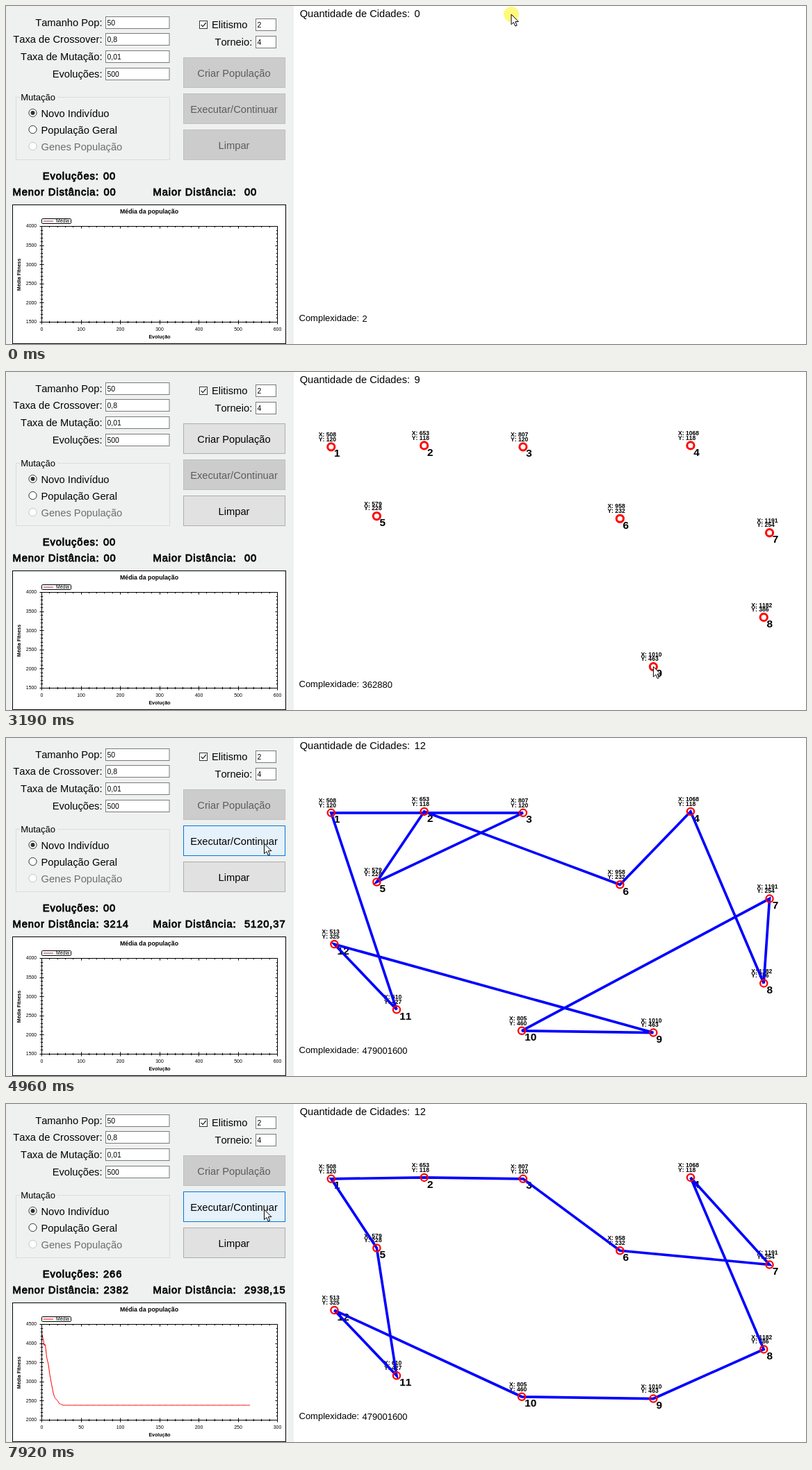
An HTML page that plays this animation: 1151 px wide and 487 px high, repeating every 8000 ms.

```html
<!DOCTYPE html>
<html lang="pt">
<head>
<meta charset="utf-8">
<style>
html, body { margin: 0; width: 100%; height: 100%; overflow: hidden; background: #fff; }
svg { display: block; width: 1151px; height: 487px; }
text { font-family: "Liberation Sans", Arial, sans-serif; font-size: 14.7px; font-kerning: none; white-space: pre; }
.b { stroke: #000; stroke-width: .8px; letter-spacing: .92px; }
.num { font-size: 15.4px; font-weight: bold; }
.xy { font-size: 8.6px; font-weight: bold; }
.in { font-size: 10.4px; }
.md { font-size: 13px; }
.tiny { font-size: 6.9px; }
.axis { font-size: 7px; font-weight: bold; }
.title { font-size: 8.8px; font-weight: bold; }
</style>
</head>
<body>
<svg id="stage" viewBox="0 0 1151 487">
  <g id="form"></g>
  <g id="chart"></g>
  <g id="map"></g>
  <circle id="press" r="11" fill="#fff97c"/>
  <g id="rings"></g>
  <path id="arrow" d="M0 0V14.6L3.4 11.5 5.8 17 8.2 16 5.8 10.6H10.4Z" fill="#fff" stroke="#000" stroke-width="1"/>
</svg>
<script>
const LOOP = 8000;
const $ = id => document.getElementById(id);
const text = (x, y, s, cls = '', anchor = 'start', fill = '#000') =>
  `<text x="${x}" y="${y}" class="${cls}" text-anchor="${anchor}" fill="${fill}">${s}</text>`;
const rect = (x, y, w, h, fill, stroke, extra = '') =>
  `<rect x="${x}" y="${y}" width="${w}" height="${h}" fill="${fill}" stroke="${stroke}" ${extra}/>`;
const line = (x1, y1, x2, y2) => `M${x1} ${y1}L${x2} ${y2}`;
const snap = v => Math.floor(v) + .5;

// X and Y as labelled, and the moment each city is added
const cities = [
  [508, 120, 240], [653, 118, 620], [807, 120, 1010], [1068, 118, 1480],
  [579, 228, 1860], [958, 232, 2110], [1191, 254, 2440], [1182, 386, 2850],
  [1010, 463, 3170], [805, 460, 3500], [610, 427, 3840], [513, 325, 4120]
].map(([X, Y, t]) => ({ X, Y, t, x: 467.8 + (X - 508) * .9235, y: 107.8 + (Y - 120) * .9235 }));

const CREATE = 4450, RUN = 4940;
const stops = [
  { x: 727, y: 12, t: 65 },
  ...cities,
  { x: 388.5, y: 92, t: CREATE },
  { x: 388.5, y: 92, t: 4560, idle: true },
  { x: 371.5, y: 152, t: RUN }
];

const stages = [
  { from: 0, tour: [1, 3, 5, 2, 6, 4, 8, 7, 10, 9, 12, 11], worst: '5120,37' },
  { from: 12, tour: [1, 3, 2, 6, 7, 4, 8, 9, 11, 10, 12, 5], worst: '4306,82' },
  { from: 20, tour: [1, 2, 3, 6, 7, 4, 8, 9, 11, 10, 12, 5], worst: '3482,6' },
  { from: 32, tour: [1, 2, 3, 6, 7, 4, 8, 9, 10, 12, 11, 5], worst: '2938,15' }
];
for (const s of stages) {
  s.path = s.tour.map(n => cities[n - 1]);
  s.best = Math.round(s.path.reduce((sum, c, i) => {
    const d = s.path[(i + 1) % s.path.length];
    return sum + Math.hypot(c.X - d.X, c.Y - d.Y);
  }, 0));
}

// Mean fitness of each generation, as heights on the 2000 to 4500 scale
const drop = [330, 336, 339, 348, 346, 352, 363, 369, 373, 380, 389, 395, 401, 407, 413, 418,
  421.5, 424, 425, 426.5, 427.5, 429, 431.5, 432, 432.3, 433, 433.3, 434];
const mean = e => 4500 - (drop[Math.min(e, drop.length - 1)] - 317.5) * 2500 / 138;

const runs = [[4950, 0], [5580, 60], [6670, 163], [7920, 266], [8000, 266]];
function generation(t) {
  for (let i = runs.length - 2; i >= 0; i--) {
    const [t0, e0] = runs[i], [t1, e1] = runs[i + 1];
    if (t < t0) continue;
    const n = Math.round((t1 - t0) / 78);
    return Math.round(e0 + (e1 - e0) * Math.floor((t - t0) / (t1 - t0) * n) / n);
  }
  return 0;
}

function field(x, y, w, value) {
  return rect(x + .5, y + .5, w, 17, '#fff', '#7a7a7a') + text(x + 2.5, y + 12.7, value, 'in');
}

function button(y, label, state) {
  const [fill, edge, ink] = {
    off: ['#ccc', '#bfbfbf', '#5c5c5c'],
    on: ['#e1e1e1', '#adadad', '#000'],
    hover: ['#e5f1fb', '#0078d7', '#000'],
    down: ['#cce4f7', '#005499', '#000']
  }[state];
  return rect(255.5, y + .5, 146, 43, fill, edge) + text(328, y + 27.5, label, '', 'middle', ink);
}

function radio(y, label, on, enabled = true) {
  const edge = enabled ? '#333' : '#c4c4c4';
  return `<circle cx="38.5" cy="${y}" r="5.6" fill="#fff" stroke="${edge}"/>` +
    (on ? `<circle cx="38.5" cy="${y}" r="3" fill="#333"/>` : '') +
    text(50.5, y + 5.7, label, '', 'start', enabled ? '#000' : '#6d6d6d');
}

function drawForm(ui) {
  const rows = [['Tamanho Pop:', '50', 15], ['Taxa de Crossover:', '0,8', 39],
    ['Taxa de Mutação:', '0,01', 64], ['Evoluções:', '500', 89]];
  return rect(0, 0, 414, 487, '#eff0f0', 'none') +
    rows.map(([s, v, y]) => text(138.5, y + 14.3, s, '', 'end') + field(143, y, 91.5, v)).join('') +
    rect(278.5, 21.5, 11, 11, '#fff', '#333') +
    '<path d="M280.7 27L283.2 29.7 287.8 24" fill="none" stroke="#222" stroke-width="1.2"/>' +
    text(296, 31.5, 'Elitismo') + field(359, 18, 29, '2') +
    text(354.3, 57, 'Torneio:', '', 'end') + field(359, 43, 29, '4') +
    rect(14.5, 131.5, 221, 90, 'none', '#dcdcdc') + rect(20, 128, 54, 8, '#eff0f0', 'none') +
    text(21.2, 136, 'Mutação', 'md') +
    radio(154, 'Novo Indivíduo', true) + radio(178, 'População Geral') +
    radio(202, 'Genes População', false, false) +
    button(74, 'Criar População', ui.create) +
    button(126, 'Executar/Continuar', ui.run) +
    button(178, 'Limpar', ui.clear) +
    text(52.7, 249.7, 'Evoluções:', 'b') + text(140, 249.7, ui.evo || '00', 'b') +
    text(9.5, 272.7, 'Menor Distância:', 'b') + text(140.5, 272.7, ui.best, 'b') +
    text(211.5, 272.7, 'Maior Distância:', 'b') + text(343, 272.7, ui.worst, 'b');
}

// Automatic axis: ten percent grace, about seven steps of 1, 2 or 5
function scale(min, max, fromZero) {
  const grace = (max - min) * .1;
  const lo = fromZero ? 0 : min - grace, hi = max + grace;
  const raw = (hi - lo) / 7, mag = 10 ** Math.floor(Math.log10(raw));
  const m = Math.floor(raw / mag + .5);
  const step = mag * (m > 5 ? 10 : m > 2 ? 5 : m > 1 ? 2 : 1);
  return { lo: Math.floor(lo / step) * step, hi: Math.ceil(hi / step) * step, step };
}

function drawChart(evo) {
  let ax = { lo: 0, hi: 600, step: 100 }, ay = { lo: 1500, hi: 4000, step: 500 };
  if (evo > 1) {
    ax = scale(0, evo - 1, true);
    ay = scale(mean(evo - 1), mean(0));
  }
  const L = 51.5, T = 317.5, B = 455.5;
  const R = 390.5 + 1.5 * (3 - String(ax.hi).length);
  const px = v => L + (v - ax.lo) / (ax.hi - ax.lo) * (R - L);
  const py = v => B - (v - ay.lo) / (ay.hi - ay.lo) * (B - T);
  const fmt = (v, step) => step < 1 ? v.toFixed(1) : Math.round(v);
  let ticks = '', labels = '';
  const nx = Math.round((ax.hi - ax.lo) / ax.step * 5);
  for (let i = 0; i <= nx; i++) {
    const v = ax.lo + i * ax.step / 5, x = px(v), tx = snap(x), s = i % 5 ? 1.7 : 3;
    ticks += line(tx, B - s, tx, B + s) + line(tx, T, tx, T + s);
    if (i % 5 === 0) labels += text(x, 467.6, fmt(v, ax.step), 'tiny', 'middle');
  }
  const ny = Math.round((ay.hi - ay.lo) / ay.step * 5);
  for (let i = 0; i <= ny; i++) {
    const v = ay.lo + i * ay.step / 5, y = py(v), ty = snap(y), s = i % 5 ? 1.7 : 3;
    ticks += line(L - s, ty, L + s, ty) + line(R, ty, R - s, ty);
    if (i % 5 === 0) labels += text(44.2, y + 1.9, fmt(v, ay.step), 'tiny', 'end');
  }
  let curve = '';
  if (evo > 1) for (let e = 0; e < evo; e++) curve += `${px(e).toFixed(2)},${py(mean(e)).toFixed(2)} `;
  return rect(9.5, 286.5, 393, 200, '#fff', '#000') +
    text(206, 298.7, 'Média da população', 'title', 'middle') +
    rect(51.5, 306.5, 42, 7, '#fff', '#000', 'rx="1"') +
    `<path d="M54 310H68" stroke="${evo ? '#f00' : '#a03030'}"/>` + text(72, 312.1, 'Média', 'tiny') +
    `<polyline points="${curve}" fill="none" stroke="#f00"/>` +
    rect(L, T, R - L, B - T, 'none', '#000') +
    `<path d="${ticks}" stroke="#000"/>` + labels +
    text((L + R) / 2, 478.6, 'Evolução', 'axis', 'middle') +
    `<g transform="translate(20.7 387) rotate(-90)">${text(0, 0, 'Média Fitness', 'axis', 'middle')}</g>`;
}

function drawMap(shown, stage) {
  let fact = 1;
  for (let i = 2; i <= shown.length; i++) fact *= i;
  const ring = (c, w) => `<circle cx="${c.x}" cy="${c.y}" r="5.1" fill="none" stroke="#f00" stroke-width="${w}"/>`;
  const notes = shown.map((c, i) =>
    text(c.x - 18, c.y - 14.9, 'X: ' + c.X, 'xy') + text(c.x - 18, c.y - 8.1, 'Y: ' + c.Y, 'xy') +
    text(c.x + 4.2, c.y + 14.6, i + 1, 'num')).join('');
  const route = stage
    ? `<polygon points="${stage.path.map(c => c.x + ',' + c.y).join(' ')}" fill="none" stroke="#00f" stroke-width="3.7"/>` : '';
  $('map').innerHTML = text(422.7, 15.5, 'Quantidade de Cidades:') + text(587.5, 15.5, shown.length) +
    text(421.5, 454.2, 'Complexidade:', 'md') + text(512.5, 454.7, shown.length ? fact : 2, 'md') +
    notes + route;
  $('rings').innerHTML = shown.map(c => ring(c, stage ? 2.3 : 3)).join('');
}

function pointer(t) {
  let i = stops.findIndex(s => t < s.t);
  if (i < 0) i = stops.length - 1;
  const b = stops[i], a = stops[Math.max(i - 1, 0)];
  const start = a.t + 100, end = b.t - 110;
  let k = i < 2 ? 1 : Math.min(1, Math.max(0, (t - start) / (end - start)));
  k = k * k * (3 - 2 * k);
  return {
    x: a.x + (b.x - a.x) * k,
    y: a.y + (b.y - a.y) * k,
    down: t < b.t && !b.idle && (i < 2 || t >= end)
  };
}

const last = {};
function update(id, key, draw) {
  if (last[id] === key) return;
  last[id] = key;
  draw();
}

function render(t) {
  const p = pointer(t);
  const shown = cities.filter(c => t >= c.t);
  const evo = generation(t), running = t >= 4950;
  const stage = running ? stages.filter(s => evo >= s.from).pop() : null;
  const over = y => p.x > 255 && p.x < 402 && p.y > y && p.y < y + 44;
  const state = (y, enabled) => !enabled ? 'off' : over(y) ? (p.down ? 'down' : 'hover') : 'on';
  const ui = {
    create: state(74, shown.length > 2 && !running),
    run: state(126, t >= CREATE),
    clear: state(178, shown.length > 0),
    evo,
    best: stage ? stage.best : '00',
    worst: stage ? stage.worst : '00'
  };
  update('form', JSON.stringify(ui), () => $('form').innerHTML = drawForm(ui));
  update('chart', evo, () => $('chart').innerHTML = drawChart(evo));
  update('map', shown.length + '/' + ui.best, () => drawMap(shown, stage));
  const at = `translate(${p.x} ${p.y})`;
  $('arrow').setAttribute('transform', at);
  $('press').setAttribute('transform', at);
  $('press').setAttribute('visibility', p.down ? 'visible' : 'hidden');
}

const begin = performance.now();
function tick() {
  render((performance.now() - begin) % LOOP);
  requestAnimationFrame(tick);
}
render(0);
requestAnimationFrame(tick);
</script>
</body>
</html>
```
